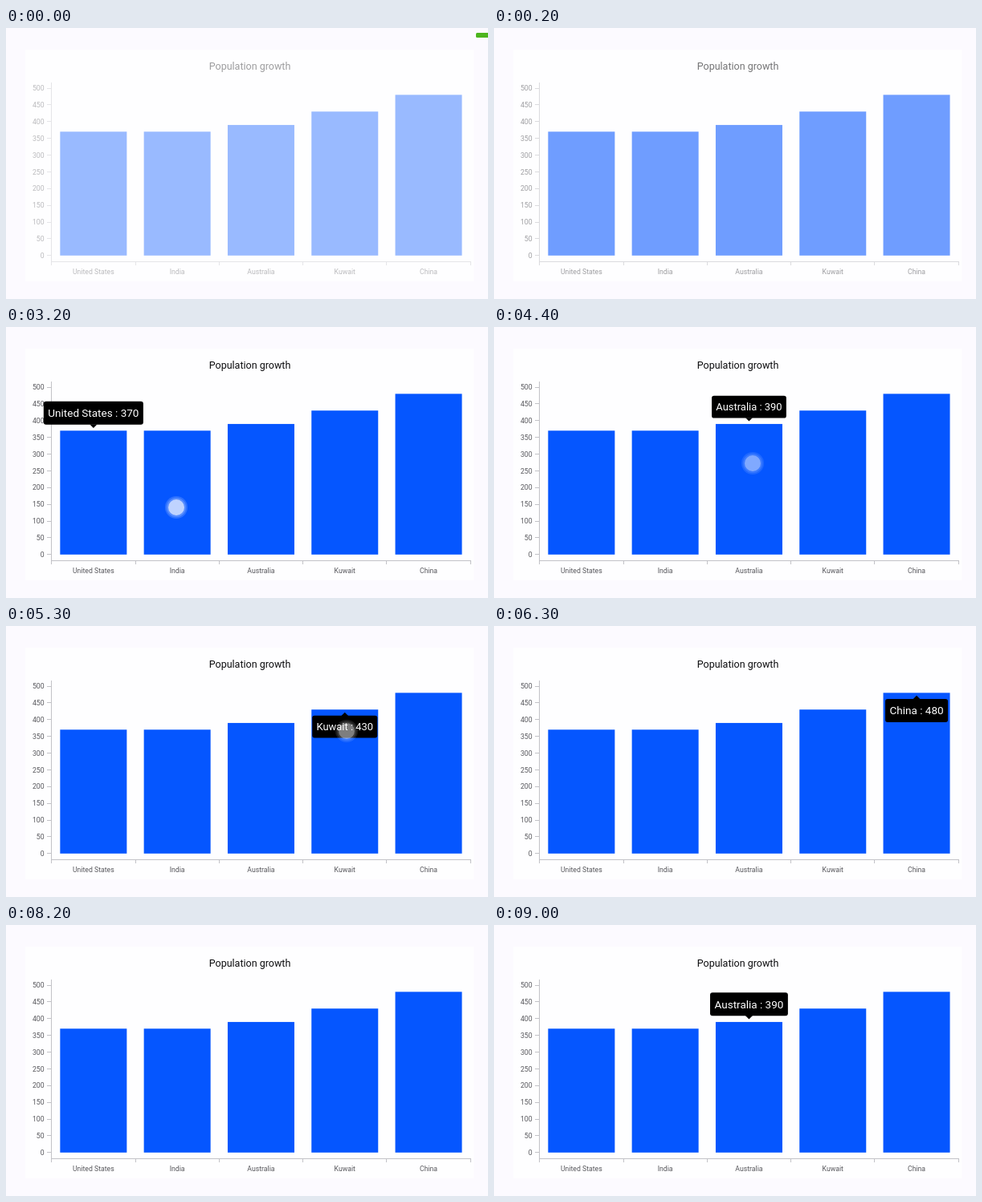
Write an HTML page that moves like this. It is 600 px wide and 338 px high and loops after 9.1 s.

```html
<!DOCTYPE html>
<html lang="en">
<head>
<meta charset="utf-8">
<title>Population growth</title>
<style>
  html, body { margin: 0; width: 100%; height: 100%; overflow: hidden; background: #fcfaff; }
  svg { display: block; width: 100vw; height: 100vh; font-family: Roboto, Arial, sans-serif; }
  .card { fill: #fefeff; }
  .title { font-size: 12.5px; fill: #0c0c0e; text-anchor: middle; }
  .label { font-size: 8.7px; fill: #55555a; }
  .mid { text-anchor: middle; }
  .end { text-anchor: end; }
  .axis { fill: none; stroke: #c2c2c7; stroke-width: 1; }
  .bar { fill: #0556ff; }
  .tip { fill: #000; }
  .tip text { font-size: 13.5px; fill: #fff; text-anchor: middle; }
</style>
</head>
<body>
<svg viewBox="0 0 600 338">
  <rect class="card" x="24" y="27" width="558.5" height="289"/>
  <g id="chart">
    <text class="title" x="303.5" y="52.4">Population growth</text>
  </g>
  <g id="tips"></g>
  <g id="touch">
    <circle r="14" fill="#fff" opacity=".16"/>
    <circle r="12" fill="#fff" opacity=".2"/>
    <circle r="10" fill="#fff" opacity=".62"/>
  </g>
  <rect id="dash" x="585" y="6" width="18" height="6" rx="1.5" fill="#4db51e"/>
</svg>
<script>
const LOOP = 9100, STEP = 100;
const LEFT = 56.7, BASE = 283.8, SLOT = 104.3, UNIT = 0.4176, BAR = 83;
const data = [['United States', 370], ['India', 370], ['Australia', 390], ['Kuwait', 430], ['China', 480]];

// Each tap: time, bar, touch point and, if not replaced by the next tap, when its tooltip closes
const taps = [
  { at: 1800, bar: 0, x: 101, y: 249 },
  { at: 3200, bar: 1, x: 212, y: 225 },
  { at: 4200, bar: 2, x: 322, y: 170 },
  { at: 5100, bar: 3, x: 424, y: 131 },
  { at: 5900, bar: 4, x: 530, y: 190, until: 7700 },
  { at: 8600, bar: 2, x: 286, y: 262 }
];
const SHOW = 100;

const $ = id => document.getElementById(id);
const chart = $('chart'), tips = $('tips'), touch = $('touch'), dash = $('dash');

function add(parent, tag, attrs, text) {
  const el = document.createElementNS('http://www.w3.org/2000/svg', tag);
  for (const k in attrs) el.setAttribute(k, attrs[k]);
  if (text !== undefined) el.textContent = text;
  parent.appendChild(el);
  return el;
}

const barX = i => LEFT + SLOT * (i + 0.5);
const valueY = v => BASE - v * UNIT;

function drawAxes() {
  let d = 'M56.5 68V296M56 291.5H578.5';
  for (let v = 0; v <= 500; v += 50) {
    const y = valueY(v);
    d += `M51 ${Math.floor(y) + 0.5}H56`;
    add(chart, 'text', { class: 'label end', x: 47.6, y: y + 3.1 }, v);
  }
  for (let i = 1; i <= 5; i++) d += `M${Math.floor(LEFT + SLOT * i) + 0.5} 291V296`;
  add(chart, 'path', { class: 'axis', d });
}

function drawBar([name, value], i) {
  const x = barX(i), y = valueY(value);
  add(chart, 'rect', { class: 'bar', x: x - BAR / 2, y, width: BAR, height: BASE - y });
  add(chart, 'text', { class: 'label mid', x, y: 307 }, name);
}

// Tooltip drawn around its arrow tip; it flips below when there is no room above
function makeTip([name, value], i) {
  const below = value > 400, s = below ? 1 : -1;
  const g = add(tips, 'g', { class: 'tip' });
  const text = add(g, 'text', { x: 0, y: s * 18.7 + 4.8 }, `${name} : ${value}`);
  const w = text.getComputedTextLength() + 11;
  const box = add(g, 'rect', { x: -w / 2, y: below ? 4.2 : -33.2, width: w, height: 29, rx: 3 });
  const arrow = add(g, 'path', { d: `M0 0L4.5 ${s * 4.5}H-4.5Z` });
  g.prepend(box, arrow);
  return { g, x: barX(i), y: valueY(value) + s * 3.4 };
}

drawAxes();
data.forEach(drawBar);
const tipList = data.map(makeTip);

const clamp = v => Math.max(0, Math.min(1, v));
const easeOut = p => 1 - (1 - p) ** 3;

function render(t) {
  chart.setAttribute('opacity', 0.4 + 0.6 * clamp(t / 700));
  dash.style.display = t < 100 ? '' : 'none';

  let shown = -1, scale = 0, glow = 0;
  taps.forEach((tap, i) => {
    const age = t - tap.at;
    if (age < 0) return;
    if (age >= SHOW) {
      shown = t < (tap.until || LOOP) ? tap.bar : -1;
      scale = easeOut(clamp((age - 50) / 230));
    }
    if (age < 400) {
      glow = age <= 100 ? 1 : 1 - (age - 100) / 300;
      touch.setAttribute('transform', `translate(${tap.x} ${tap.y})`);
    }
  });

  touch.setAttribute('opacity', glow);
  tipList.forEach((tip, i) => {
    tip.g.style.display = i === shown ? '' : 'none';
    if (i === shown) tip.g.setAttribute('transform', `translate(${tip.x} ${tip.y}) scale(${scale})`);
  });
}

const start = performance.now();
function tick(now) {
  const t = Math.max(0, now - start) % LOOP;
  render(Math.floor(t / STEP) * STEP);
  requestAnimationFrame(tick);
}
render(0);
requestAnimationFrame(tick);
</script>
</body>
</html>
```
